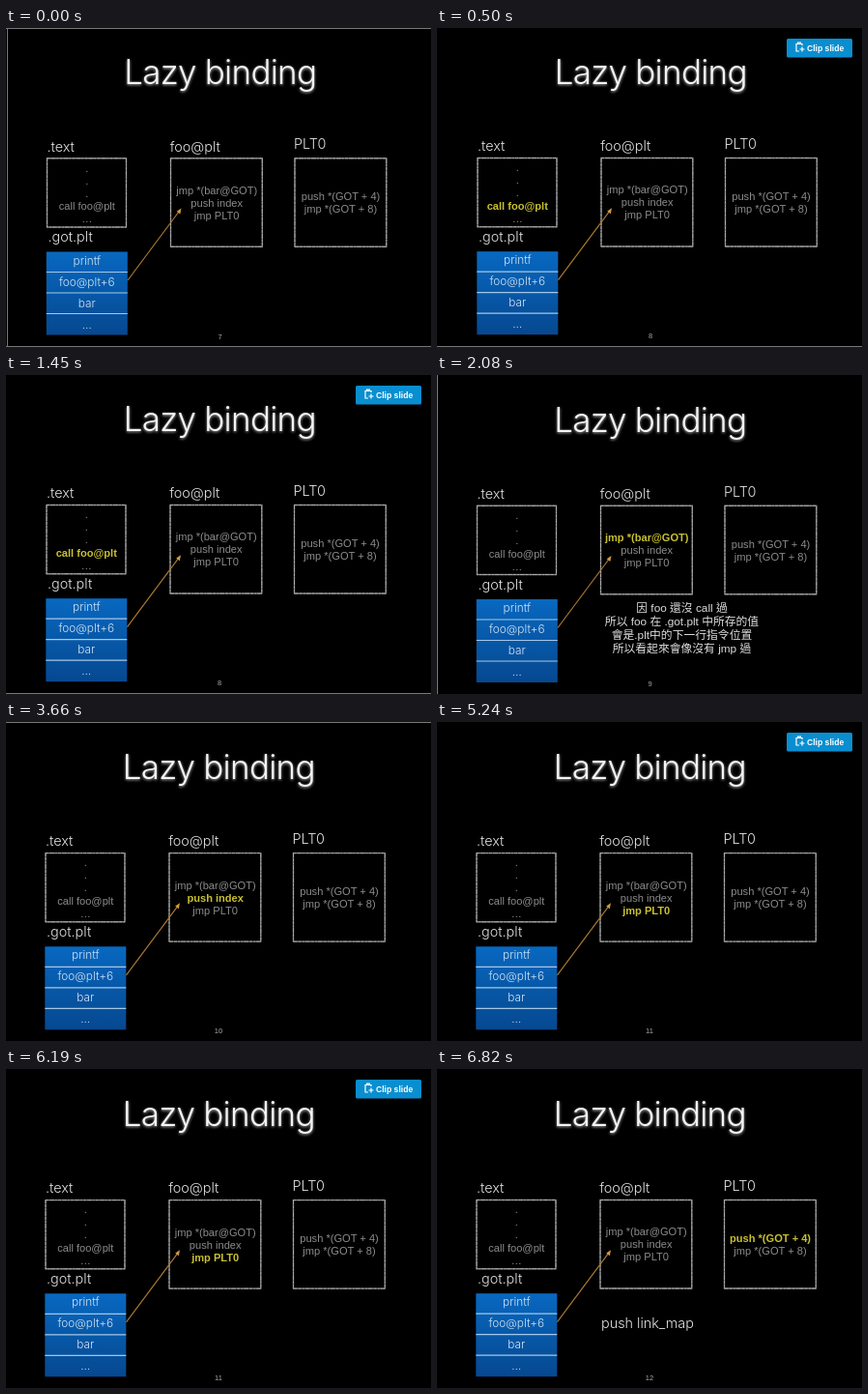
An HTML page that plays this animation: 440x330 px, repeating every 8000 ms.

```html
<!DOCTYPE html>
<html lang="en">
<head>
<meta charset="utf-8">
<title>Lazy binding</title>
<style>
html, body { margin: 0; width: 100%; height: 100%; overflow: hidden; background: #000 }
svg { display: block; width: 440px; height: 330px; font: 11.1px "Liberation Sans", Arial, sans-serif }
text { white-space: pre }
.title { font: 300 35px Inter, sans-serif; letter-spacing: -.75px; fill: #f4f4f4; filter: drop-shadow(.8px 1.2px 1.8px #aaa) }
.label { font: 300 14.4px Inter, sans-serif; fill: #e2e2e2 }
.code { fill: #8c8c8c }
.code.on { fill: #c9c030; font-weight: bold }
.cell { font: 300 11.8px Inter, sans-serif; fill: #d4e6f6 }
.note { font: 11.8px "Liberation Sans", "Noto Sans CJK TC", "Noto Sans CJK", sans-serif; fill: #ddd }
.page { font-size: 7.5px; fill: #aaa }
.mid { text-anchor: middle }
.clip { font-size: 8.6px; font-weight: bold; fill: #fff }
</style>
</head>
<body>
<svg id="stage" viewBox="0 0 440 330"></svg>
<script>
const stage = document.getElementById('stage');
const starts = [0, 500, 2080, 3660, 5240, 6820];
const loop = 8000;
// The slides sit at slightly different places on the stage.
const shifts = [[1.5, -.5], [1, -.8], [.5, 0], [0, .3], [0, .3], [0, .2]];
const edges = ['M0 .5H440M1.5 0V330M0 329.5H440', 'M0 329.5H440', 'M.5 0V330', 'M0 .5H440', '', ''];
const highlights = ['', 'call foo@plt', 'jmp *(bar@GOT)', 'push index', 'jmp PLT0', 'push *(GOT + 4)'];

const text = (x, y, s, cls) => `<text x="${x}" y="${y}" class="${cls}">${s}</text>`;
const line = (d, color, width = 1) => `<path d="${d}" fill="none" stroke="${color}" stroke-width="${width}"/>`;
const rect = (x, y, w, h, fill) => `<rect x="${x}" y="${y}" width="${w}" height="${h}" fill="${fill}"/>`;

// Chalk outline: a soft line below a broken bright one.
function box(x, y, w, h) {
  const d = `M${x} ${y}h${w}v${h}h${-w}z`;
  return line(d, '#777', 1.4) +
    `<path d="${d}" fill="none" stroke="#bbb" stroke-width=".8" stroke-dasharray="3 1 5 .8 2 1.2"/>`;
}

function table() {
  const names = ['printf', 'foo@plt+6', 'bar', '…'];
  return rect(40.3, 232, 84, 86, 'url(#blue)') +
    [253, 274.5, 296].map(y => line(`M40.3 ${y}h84`, '#a4c8e6', 1.2)).join('') +
    names.map((s, i) => text(82.3, 245 + i * 22, s, 'cell mid')).join('');
}

function clipButton() {
  return `<rect x="362" y="11" width="68" height="19.5" rx="1.5" fill="#098ed0"/>` +
    line('M378 18v-1.5h-6v7.5h3M373.6 16.5v-1.4h2.8v1.4M378 19.5v5M375.5 22h5', '#fff', 1.2) +
    text(383, 23.5, 'Clip slide', 'clip');
}

function slide(n) {
  const code = (x, y, s) => text(x, y, s, 'code mid' + (s === highlights[n] ? ' on' : ''));
  let out = `<defs><linearGradient id="blue" x2="0" y2="1">
    <stop stop-color="#0868c0"/><stop offset="1" stop-color="#064890"/></linearGradient></defs>`;
  out += `<g transform="translate(${shifts[n]})">` +
    text(220.3, 58.5, 'Lazy binding', 'title mid') +
    text(41, 128, '.text', 'label') + text(168.2, 128, 'foo@plt', 'label') +
    text(296.5, 125.5, 'PLT0', 'label') + text(42, 221.5, '.got.plt', 'label') +
    box(41, 135.3, 82, 71.2) + box(169, 135.3, 94.8, 91.5) + box(297.5, 135.3, 94.8, 91.5) +
    [149, 162, 175].map(y => code(82.3, y, '.')).join('') +
    code(82.3, 188.5, 'call foo@plt') + code(82.3, 201.5, '…') +
    code(216.7, 172.3, 'jmp *(bar@GOT)') + code(216.7, 185.3, 'push index') + code(216.7, 198.3, 'jmp PLT0') +
    code(345, 178.5, 'push *(GOT + 4)') + code(345, 191.5, 'jmp *(GOT + 8)') +
    table() +
    line('M124.5 261.5L177.5 190.5', '#a87830', 1.2) +
    '<path d="M180 187l-1.2 6-3.6-2.7z" fill="#d19a45"/>' +
    text(220, 322, n + 7, 'page mid') + '</g>';
  if (n === 2) {
    out += ['因 foo 還沒 call 過', '所以 foo 在 .got.plt 中所存的值',
      '會是.plt中的下一行指令位置', '所以看起來會像沒有 jmp 過']
      .map((s, i) => text(253.5, 244.5 + i * 14, s, 'note mid')).join('');
  }
  if (n === 5) out += text(170, 267.5, 'push link_map', 'label');
  if (n === 1 || n === 4) out += clipButton();
  return out + line(edges[n], '#777');
}

let shown = -1;
function tick() {
  const t = performance.now() % loop;
  const n = starts.findLastIndex(s => s <= t);
  if (n !== shown) stage.innerHTML = slide(shown = n);
  requestAnimationFrame(tick);
}
tick();
</script>
</body>
</html>
```
